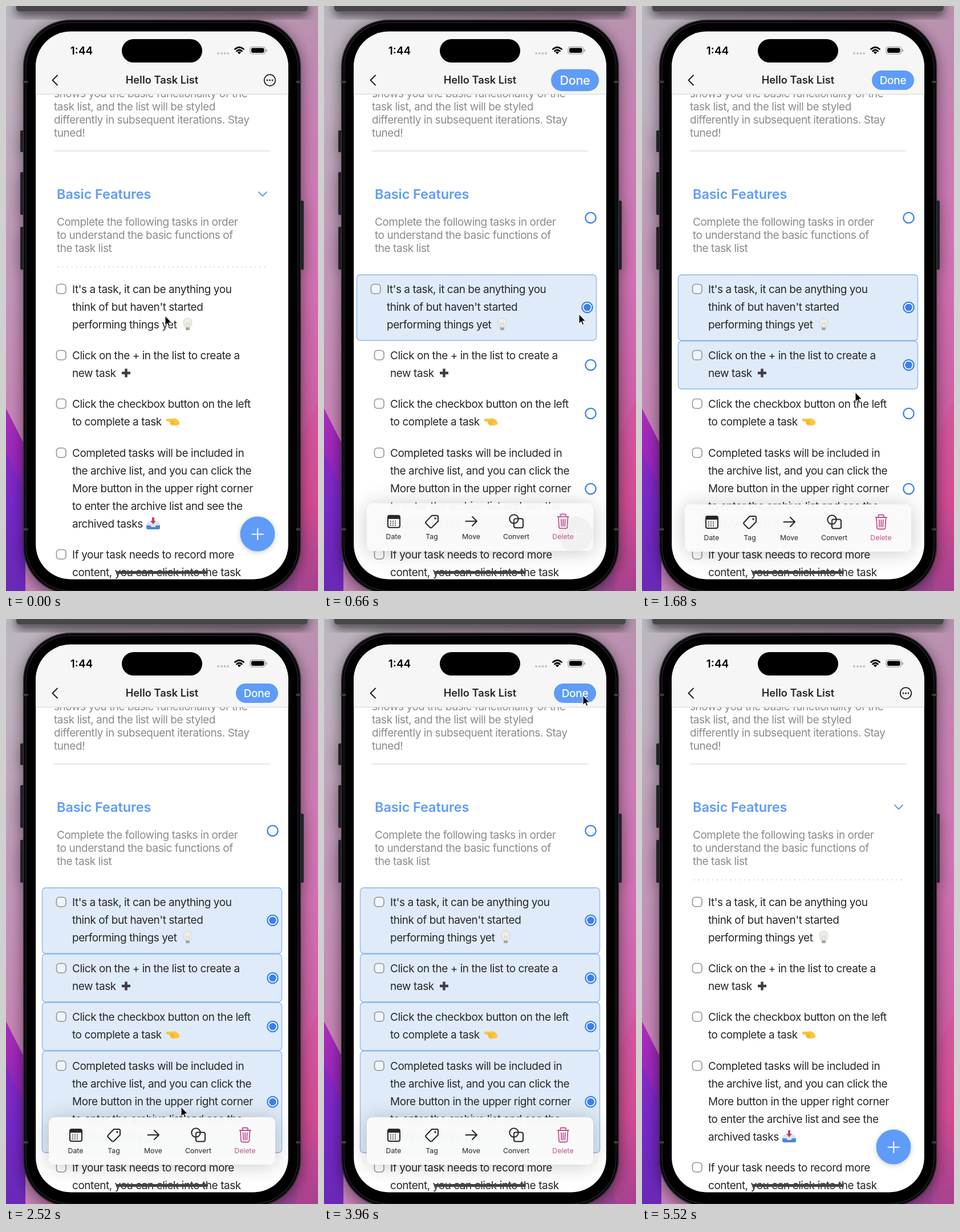
These frames come from a looping animation (547 px wide and 1025 px high, 5580 ms). An HTML page:

```html
<!DOCTYPE html>
<html lang="en">
<head>
<meta charset="utf-8">
<title>Task list</title>
<style>
html, body { margin: 0; width: 100%; height: 100%; overflow: hidden; }
svg { display: block; width: 100%; height: 100%; }
text { font: 400 19px Inter, "Liberation Sans", sans-serif; letter-spacing: -.45px; fill: #27272a; white-space: pre; }
.note { fill: #8b8b90; }
.bold { font-weight: 600; }
.mid { text-anchor: middle; }
.label { font-size: 12.3px; letter-spacing: 0; }
.line { fill: none; stroke-linecap: round; stroke-linejoin: round; }
</style>
</head>
<body>
<svg id="stage" viewBox="0 0 547 1025"></svg>
<script>
const LOOP = 5580, STEP = 60, SELECT = 480, DONE = 4140;
const BLUE = '#5e9cf8', RING = '#3a80ee', PINK = '#c0528f', INK = '#27272a';

const rect = (x, y, w, h, r, fill, more = '') =>
  `<rect x="${x}" y="${y}" width="${w}" height="${h}" rx="${r}" fill="${fill}" ${more}/>`;
const circle = (x, y, r, fill, more = '') => `<circle cx="${x}" cy="${y}" r="${r}" fill="${fill}" ${more}/>`;
const line = (d, color, w = 2, more = '') => `<path class="line" d="${d}" stroke="${color}" stroke-width="${w}" ${more}/>`;
const text = (x, y, s, cls = '', more = '') => `<text x="${x}" y="${y}" class="${cls}" ${more}>${s}</text>`;
const lines = (x, y, gap, list, cls) => list.map((s, i) => text(x, y + i * gap, s, cls)).join('');
const group = (id, body, more = '') => `<g id="${id}" ${more}>${body}</g>`;
const gradient = (id, stops, x = 0, y = 1025) =>
  `<linearGradient id="${id}" x2="${x}" y2="${y}" gradientUnits="userSpaceOnUse">` +
  stops.map(([o, c]) => `<stop offset="${o}" stop-color="${c}"/>`).join('') + '</linearGradient>';
const shadow = (id, dy, blur, alpha) => `<filter id="${id}" x="-30%" y="-60%" width="160%" height="220%">
  <feDropShadow dx="0" dy="${dy}" stdDeviation="${blur}" flood-opacity="${alpha}"/></filter>`;

const bulb = `<path d="M313 561C310 556 310 547 318.500 547S327 556 324 561L322 564H315Z" fill="#ededea" stroke="#cfcfcc"/>
  <path d="M316 562V555L318.500 557 321 555V562" fill="none" stroke="#d8cfa8"/>` +
  rect(315, 563, 7, 5, 1.5, '#a6a6a8');
const plus = '<path d="M203 643H218M210.500 635.500V650.500" stroke="#403a45" stroke-width="4.4"/>';
const hand = `<path d="M282 723H292L295 722Q302 724 304 729V733Q298 736 291 735Q288 734 288 731L286 728H282Q279.500 725 282 723Z" fill="#fdc53c"/>` +
  line('M288 728H294M289 731.500H294', '#dc9a20', 1);
const tray = `<path d="M250 903H266L270 911V914Q270 917 267 917H249Q246 917 246 914V911Z" fill="#4c86d8"/>
  <path d="M250 903H266L269 910H263L261 913H255L253 910H247Z" fill="#dce5f2"/>
  <path d="M256 896H260V902H263L258 908 253 902H256Z" fill="#c83d63"/>`;

const tasks = [
  { y: 503, top: 471, h: 115, radio: 528, at: SELECT, icon: bulb,
    say: ["It's a task, it can be anything you", "think of but haven't started", 'performing things yet'] },
  { y: 619, top: 587, h: 84, radio: 629, at: 1500, icon: plus,
    say: ['Click on the + in the list to create a', 'new task'] },
  { y: 704, top: 672, h: 84, radio: 714, at: 1860, icon: hand,
    say: ['Click the checkbox button on the left', 'to complete a task'] },
  { y: 790, top: 757, h: 178, radio: 846, at: 2340, icon: tray,
    say: ['Completed tasks will be included in', 'the archive list, and you can click the',
      'More button in the upper right corner', 'to enter the archive list and see the', 'archived tasks'] },
  { y: 968, icon: '', say: ['If your task needs to record more', 'content, you can click into the task'] }
];

const ring = y => circle(467.5, y, 9.2, '#fff', `stroke="${RING}" stroke-width="2.3"`);
const task = (t, i) => group('task' + i,
  (t.at ? rect(63.5, t.top, 420, t.h, 6, '#dfebf9', `id="card${i}" stroke="#86b5ef" stroke-width="1.3"`) : '') +
  rect(88.5, t.y - 15.5, 16.5, 16.5, 5, '#fff', 'fill-opacity=".5" stroke="#929297" stroke-width="1.6"') +
  lines(116, t.y, 31, t.say) + t.icon +
  (t.at ? group('radio' + i, ring(t.radio) + circle(467.5, t.radio, 6.3, RING, `id="dot${i}"`)) : ''));

const calendar = rect(112, 894, 21, 21, 3, 'none', `stroke="${INK}" stroke-width="2"`) +
  rect(112, 894, 21, 6, 2, INK) +
  [904, 907.5, 911].map(y => line(`M117 ${y}H129`, INK, 2, 'stroke-dasharray="0 4"')).join('');
const tag = line('M189 894H198Q200 894 200 896V904L189 915Q187.500 916 186 915L178.500 907.500Q177.500 906 179 904.500Z', INK) +
  circle(195, 899, 1.7, INK);
const arrow = line('M248.500 904H268M260 896L268 904 260 912', INK);
const convert = rect(333, 899.5, 16, 16, 3, 'none', `stroke="${INK}" stroke-width="2"`) +
  circle(333, 900, 7.7, '#fafafa', `stroke="${INK}" stroke-width="2"`) +
  line('M333 907V902Q333 899.500 335.500 899.500H340', INK, 1.8);
const trash = line('M409.500 896H429M414.500 895.500V893Q414.500 891.500 416 891.500H422.500Q424 891.500 424 893V895.500' +
  'M411 896.500L412 914Q412.200 916.500 414.500 916.500H424Q426.200 916.500 426.500 914L427.500 896.500' +
  'M415.800 900.500L416.300 912.500M419.300 900.500V912.500M422.800 900.500L422.300 912.500', PINK, 1.8);

const sky = rect(0, 0, 547, 1025, 0, 'url(#left)') +
  rect(0, 0, 547, 1025, 0, 'url(#right)', 'mask="url(#sideways)"') +
  '<path d="M0 705L34 772V1025H0Z" fill="url(#dusk)"/><path d="M0 782L34 852V1025H0Z" fill="#6a2cd2" opacity=".4"/>' +
  '<path d="M547 690L510 770V1025H547Z" fill="#d9408a" opacity=".25"/>' +
  rect(18, -12, 511, 22, 6, '#48464a', 'stroke="#6a676c" filter="url(#barShade)"');

const button = (x, y, h) => rect(x, y, 8, h, 2, '#242326');
const phone = group('body',
  button(25, 218, 38) + button(25, 291, 75) + button(25, 387, 75) + button(514, 341, 121) +
  rect(31, 25, 485, 1004, 82, '#050505', 'stroke="#29282b" stroke-width="2"'), 'filter="url(#phoneShade)"') +
  rect(35, 29, 477, 996, 78, 'none', 'stroke="#252427" stroke-width="1.5"') +
  line('M31 133H37M510 133H516M31 917H37M510 917H516', '#3a393d', 4);

const list = lines(84, 160, 23, ['shows you the basic functionality of the', 'task list, and the list will be styled',
    'differently in subsequent iterations. Stay', 'tuned!'], 'note') +
  line('M84 254H463', '#dededf', 1.3) +
  text(89, 338, 'Basic Features', 'bold', `style="font-size:23.5px;letter-spacing:-.1px;fill:${BLUE}"`) +
  lines(89, 385, 23, ['Complete the following tasks in order', 'to understand the basic functions of', 'the task list'], 'note') +
  group('idle', line('M443 326L450 333 457 326', BLUE, 2) +
    line('M91.500 457H455', '#cfcfd2', 2, 'stroke-dasharray="0 8.05"')) +
  group('radioAll', ring(371)) + tasks.map(task).join('');

const header = rect(52, 44, 443, 110, 0, '#f6f6f7') + rect(52, 154, 443, 1, 0, '#d4d4d7') +
  text(132.5, 84.5, '1:44', 'bold mid', 'style="letter-spacing:0;fill:#000"') +
  rect(203, 58, 141, 41, 20.5, '#000') +
  [372, 378, 383.5, 389].map(x => circle(x, 83, 1.9, '#c1c1c4')).join('') +
  line('M401.500 75.500Q409 69 416.500 75.500', '#000', 2.8) + line('M404.500 79Q409 75 413.500 79', '#000', 2.7) +
  '<path d="M405.800 81Q409 78.500 412.200 81L409 84.500Z"/>' +
  rect(428, 71.5, 26.5, 12.5, 4, 'none', 'stroke="#8f8f92" stroke-width="1.2"') + rect(430, 73.5, 22.5, 8.5, 2.4, '#000') +
  line('M457 76.500V79.500', '#8f8f92', 1.6) +
  line('M90 121.500L81.500 130 90 138.500', '#1c1c1e', 2) +
  text(273.5, 136, 'Hello Task List', 'bold mid', 'style="font-size:18.3px;letter-spacing:0"') +
  group('more', circle(462.5, 130, 9.8, 'none', `stroke="${INK}" stroke-width="1.8"`) +
    [458, 462.5, 467].map(x => circle(x, 130, 1.5, INK)).join('')) +
  group('done', rect(-37, -17, 74, 34, 17, BLUE) +
    text(0, 7, 'Done', 'mid', 'style="letter-spacing:-.3px;fill:#fff;font-weight:500"'));

const toolbar = group('bar', rect(75, 873, 397, 83, 11, '#fafafa', 'fill-opacity=".97" filter="url(#barGlow)"') +
  calendar + tag + arrow + convert + trash +
  [[122, 'Date'], [189, 'Tag'], [258, 'Move'], [337, 'Convert'], [419, 'Delete']]
    .map(([x, s]) => text(x, 935.5, s, 'label mid', s === 'Delete' ? `style="fill:${PINK}"` : '')).join(''));

const fab = group('fab', circle(441, 925, 30.5, BLUE, 'id="disc" filter="url(#fabShade)"') +
  line('M431.500 925.500H451M441.250 916V935', '#fff', 2));

const stage = document.getElementById('stage');
stage.innerHTML = '<defs>' +
  gradient('left', [[0, '#bcb8c0'], [.15, '#bfb4c1'], [.4, '#c39cbb'], [.7, '#c888b8']]) +
  gradient('right', [[0, '#b794ae'], [.2, '#c97fb4'], [.4, '#d176b6'], [.65, '#d062a8'], [.85, '#cf4f96'], [1, '#94408f']]) +
  gradient('dusk', [[.69, '#ad2bbb'], [.78, '#9a27be'], [.86, '#8026c4'], [1, '#6826a4']]) +
  gradient('across', [[0, '#000'], [1, '#fff']], 547, 0) +
  '<mask id="sideways" maskUnits="userSpaceOnUse" x="0" y="0" width="547" height="1025">' +
  rect(0, 0, 547, 1025, 0, 'url(#across)') + '</mask>' +
  shadow('phoneShade', 5, 13, .5) + shadow('barShade', 6, 9, .65) + shadow('barGlow', 2, 17, .22) + shadow('fabShade', 2, 4, .2) +
  '<clipPath id="screen">' + rect(52.2, 44.8, 442.6, 959.6, 61, '#fff') + '</clipPath></defs>' +
  sky + phone +
  group('view', rect(52, 44, 443, 961, 0, '#fff') + list + header + toolbar + fab +
    rect(193, 990, 161, 5, 2.5, '#454347'), 'clip-path="url(#screen)"') +
  '<path id="cursor" d="M0 0V16.500L3.800 13 6.200 18.500 8.700 17.400 6.300 12H11.500Z" fill="#000" stroke="#fff" stroke-width="1"/>';

const node = {};
stage.querySelectorAll('[id]').forEach(e => node[e.id] = e);
const set = (id, name, value) => node[id].setAttribute(name, value);
const fade = (id, value) => set(id, 'opacity', value);
const ramp = (t, from, to) => Math.min(1, Math.max(0, (t - from) / (to - from)));
const ease = u => u * u * (3 - 2 * u);
const swing = (t, damp) => Math.exp(-damp * t / 1000) * Math.cos(14 * t / 1000);

// time, x, y of the pointer
const path = [[0, 279, 543], [120, 279, 543], [480, 440, 538], [660, 447, 540], [1140, 472, 555], [1440, 400, 634],
  [1560, 396, 638], [1800, 352, 716], [1920, 348, 720], [2280, 310, 850], [2520, 307, 855], [3060, 309, 852],
  [3720, 452, 136], [3960, 454, 134], [4200, 454, 134], [4560, 116, 933], [4860, -20, 1040]];

function pointer(t) {
  const i = path.findIndex(p => p[0] > t);
  if (i < 0) return path.at(-1).slice(1);
  const [a, b] = [path[i - 1], path[i]], u = ease(ramp(t, a[0], b[0]));
  return [a[1] + (b[1] - a[1]) * u, a[2] + (b[2] - a[2]) * u];
}

function draw(t) {
  const u = t - SELECT, on = u >= 0 && t < DONE;
  const leave = ease(ramp(t, DONE, DONE + 240));
  const shown = u < 0 ? 0 : ramp(u, 0, 120) * (1 - leave);

  set('cursor', 'transform', `translate(${pointer(t)})`);
  const slide = u < 0 ? 45 * ease(ramp(t, 120, SELECT)) : 45 * swing(u, 10);
  set('task0', 'transform', `translate(${slide} 0)`);

  tasks.forEach((k, i) => {
    if (!k.at) return;
    const picked = t >= k.at ? ramp(t, k.at - STEP, k.at + STEP) * (1 - leave) : 0;
    fade('card' + i, picked);
    fade('dot' + i, picked);
    fade('radio' + i, shown);
  });
  fade('radioAll', shown);
  fade('idle', 1 - shown);
  fade('more', 1 - shown);

  fade('done', shown);
  set('done', 'transform', `translate(440 130) scale(${u < 0 ? 0 : (1 - swing(u, 10)) * (1 - .5 * leave)})`);
  fade('bar', shown);
  set('bar', 'transform', `translate(0 ${u < 0 ? 160 : 130 * swing(u, 25) + 160 * leave})`);

  set('disc', 'fill', on ? '#a0a0a4' : BLUE);
  fade('fab', on ? .5 * Math.exp(-u / 110) : u < 0 ? 1 : leave);
}

function tick() {
  draw(Math.floor(performance.now() % LOOP / STEP) * STEP);
  requestAnimationFrame(tick);
}
tick();
</script>
</body>
</html>
```
